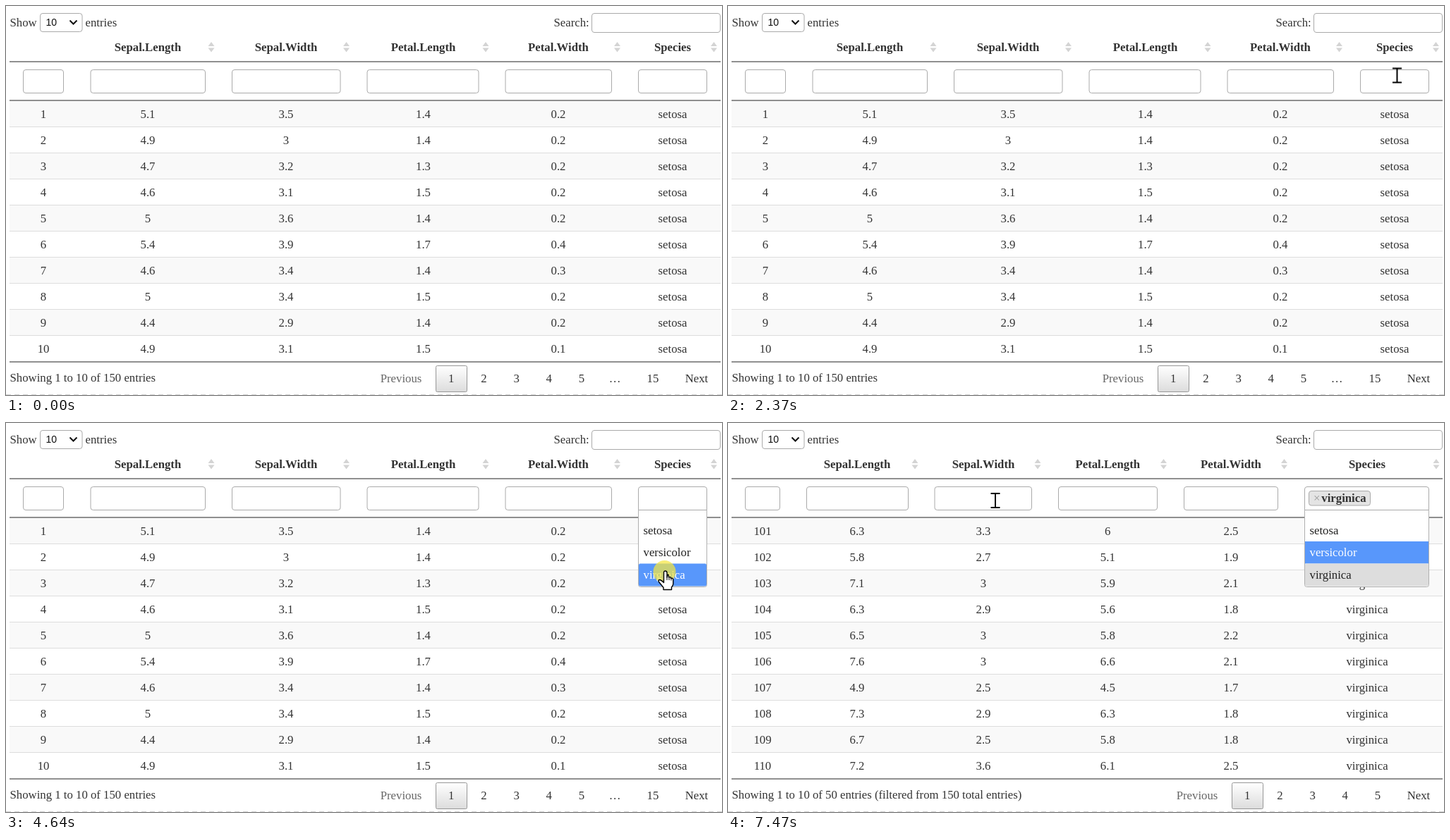
An HTML page that plays this animation: 1015x552 px, repeating every 8000 ms.

```html
<!DOCTYPE html>
<html lang="en">
<head>
<meta charset="utf-8">
<title>Iris table</title>
<style>
  html, body { margin: 0; width: 100%; height: 100%; overflow: hidden; background: #fff; }
  svg { display: block; width: 1015px; height: 552px; }
  text { font: 16.75px "Liberation Serif", "Times New Roman", serif; fill: #333; white-space: pre; }
  .bold { font-weight: bold; }
  .sans { font: 14px "Liberation Sans", Arial, sans-serif; fill: #111; }
</style>
</head>
<body>
<svg id="stage" viewBox="0 0 1015 552" xmlns="http://www.w3.org/2000/svg"></svg>
<script>
const LOOP = 8000;
const TOP = 134.5, ROW = 37;
const HEADS = ['', 'Sepal.Length', 'Sepal.Width', 'Petal.Length', 'Petal.Width', 'Species'];

const ALL = {
  centers: [53, 201, 397, 591.5, 783, 945],
  inputs: [[24.5, 81.5], [120, 282.5], [320.5, 474], [512, 670], [708, 858.5], [896.5, 993.5]],
  sorts: [291, 482.5, 680, 866.5, 1003.5],
  first: 1,
  species: 'setosa',
  rows: ['5.1 3.5 1.4 0.2', '4.9 3 1.4 0.2', '4.7 3.2 1.3 0.2', '4.6 3.1 1.5 0.2', '5 3.6 1.4 0.2',
    '5.4 3.9 1.7 0.4', '4.6 3.4 1.4 0.3', '5 3.4 1.5 0.2', '4.4 2.9 1.4 0.2', '4.9 3.1 1.5 0.1'],
  info: 'Showing 1 to 10 of 150 entries',
  page: 631.2,
  pages: ['1', '2', '3', '4', '5', '…', '15'],
};

const FILTERED = {
  centers: [49, 183, 362, 538.3, 713, 906],
  inputs: [[24.5, 73.5], [111.5, 255.5], [293, 430.5], [468.5, 608.5], [646.5, 779.5], [817.5, 993.5]],
  sorts: [265, 439, 617.5, 788.5, 1004],
  first: 101,
  species: 'virginica',
  rows: ['6.3 3.3 6 2.5', '5.8 2.7 5.1 1.9', '7.1 3 5.9 2.1', '6.3 2.9 5.6 1.8', '6.5 3 5.8 2.2',
    '7.6 3 6.6 2.1', '4.9 2.5 4.5 1.7', '7.3 2.9 6.3 1.8', '6.7 2.5 5.8 1.8', '7.2 3.6 6.1 2.5'],
  info: 'Showing 1 to 10 of 50 entries (filtered from 150 total entries)',
  page: 736.2,
  pages: ['1', '2', '3', '4', '5'],
};

// Pointer moves: start, end, number of steps, then [step, x, y] way points.
const MOVES = [
  [660, 1430, 12, [[0, 872, 548], [3, 890, 420], [6, 918, 235], [8, 936, 148], [9, 940, 129], [11, 957, 123]]],
  [1960, 2370, 6, [[0, 955, 118], [3, 950, 103], [5, 948.5, 98.5]]],
  [3760, 4380, 9, [[0, 948.5, 110], [2, 947, 138], [5, 940, 185], [8, 933, 211]]],
  [5760, 6460, 11, [[0, 925, 205], [2, 865, 178], [5, 705, 109], [7, 625, 73], [8, 592, 76], [10, 536.5, 95]]],
  [6920, 7270, 6, [[0, 515, 100], [3, 420, 108], [5, 380, 110]]],
  [7470, 7470, 1, [[0, 379, 110]]],
];

const text = (x, y, s, anchor = 'start', extra = '') =>
  `<text x="${x}" y="${y}" text-anchor="${anchor}" ${extra}>${s}</text>`;
const mid = (x, y, s, extra) => text(x, y, s, 'middle', extra);
const rect = (x1, y1, x2, y2, fill, extra = '') =>
  `<rect x="${x1}" y="${y1}" width="${x2 - x1}" height="${y2 - y1}" fill="${fill}" ${extra}/>`;
const box = (x1, y1, x2, y2, r = 3.5, fill = '#fff', stroke = '#aaa') =>
  rect(x1, y1, x2, y2, fill, `rx="${r}" stroke="${stroke}"`);
const path = (d, fill, extra = '') => `<path d="${d}" fill="${fill}" ${extra}/>`;
const rule = (y, color) => rect(5, y, 1013, y + 1, color);

function pointer(t) {
  const move = MOVES.filter(m => t >= m[0]).pop();
  if (!move) return null;
  const [start, end, count, pts] = move;
  const gap = (end - start) / (count - 1) || 1;
  const k = Math.min(count - 1, Math.floor((t - start) / gap + 0.01));
  const i = Math.max(1, pts.findIndex(p => p[0] >= k));
  const b = pts[i] || pts[0], a = pts[i - 1];
  const u = b === a ? 0 : (k - a[0]) / (b[0] - a[0]);
  return { x: a[1] + (b[1] - a[1]) * u, y: a[2] + (b[2] - a[2]) * u };
}

function pointerShape(p, view, open) {
  const over = ([a, b]) => p.x >= a && p.x <= b;
  const last = view.inputs[5];
  let art;
  if (p.y >= 90 && p.y <= 123.5 && view.inputs.some(over)) {
    art = path('M-6.5-11h13v2H1v18h5.5v2h-13v-2H-1V-9h-5.5z', '#000');
  } else if (p.y < 79 || (open && over(last) && p.y < 233)) {
    art = path('M-.5 1.5Q-.5-1 1.7-1T4 1.5V8Q6-.2 6.5 8Q9.5 6.500 9.500 9.500Q12.800 8 12.800 12V17' +
      'Q12.800 20 10.500 22V25.500H-1V22.500L-7.500 14.500Q-9 11.500-6 11.500Q-4 12-.5 15.500z',
      '#fff', 'stroke="#000" stroke-width="1.4" stroke-linejoin="round"') +
      path('M4 8v4M7 8.500v3.500M10 9.500v3', 'none', 'stroke="#000"');
  } else {
    art = path('M.5.5V20.500L5 16.300L8.200 23.500L11.200 22.200L8.100 15.200H14.800z', '#fff',
      'stroke="#222" stroke-width="1.1"');
  }
  return `<g transform="translate(${p.x} ${p.y})">${art}</g>`;
}

function topBar() {
  return text(5.5, 28.5, 'Show') + box(48.5, 10.5, 108, 36.5) +
    text(56.5, 28, '10', 'start', 'class="sans"') +
    path('M90.500 20.500l5 5l5-5', 'none', 'stroke="#111" stroke-width="2"') +
    text(112.5, 28.5, 'entries') + text(776.5, 28.5, 'Search:') + box(830.5, 10.5, 1012.5, 37.5);
}

function table(view, hover) {
  let s = '';
  view.rows.forEach((row, i) => {
    const y = TOP + ROW * i;
    const fill = i === hover ? '#f5f5f5' : i % 2 ? '#fff' : '#f9f9f9';
    s += rect(5, y, 1013, y + ROW, fill);
    if (i) s += rule(134 + ROW * i, '#ddd');
    [view.first + i, ...row.split(' '), view.species].forEach((cell, c) => {
      s += mid(view.centers[c], 158.6 + ROW * i, cell);
    });
  });
  s += rule(78.500, '#222') + rule(133.500, '#222') + rule(504.500, '#222');
  HEADS.forEach((h, c) => { s += mid(view.centers[c], 63.5, h, 'class="bold"'); });
  view.sorts.forEach(x => {
    s += path(`M${x - 4.5} 57h9l-4.500-6zM${x - 4.5} 59.500h9l-4.500 6z`, '#d4d4d4');
  });
  view.inputs.slice(0, 5).forEach(([a, b]) => { s += box(a, 90.5, b, 123.5); });
  return s;
}

function footer(view) {
  const x = view.page, y = 534;
  let s = text(5.5, 533, view.info) + mid(x - 71.2, y, 'Previous', 'style="fill:#666"') +
    box(x - 21.7, 510.5, x + 22.3, 547.5, 2, 'url(#btn)', '#979797');
  view.pages.forEach((p, i) => {
    const shift = p === '…' ? 1 : p === '15' ? 8.5 : 0;
    s += mid(x + 46.2 * i + shift, y, p);
  });
  return s + mid(979, y, 'Next') +
    path('M0 551.500H1015', 'none', 'stroke="#d2d2d2" stroke-dasharray="7 5"');
}

function dropdown(view, active, picked) {
  const [a, b] = view.inputs[5];
  const edges = [124, 136.5, 168, 199.5, 231.5];
  let s = path(`M${a} 123.500H${b}V229.500q0 3-3 3H${a + 3}q-3 0-3-3z`, '#fff', 'stroke="#b0b0b0"');
  ['', 'setosa', 'versicolor', 'virginica'].forEach((name, i) => {
    const on = i === active;
    const fill = on ? '#5897fb' : i === picked ? '#ddd' : '#fff';
    s += rect(a + 0.5, edges[i], b - 0.5, edges[i + 1], fill, i === 3 ? 'rx="2"' : '') +
      text(a + 7, 126.3 + 31.5 * i, name, 'start', `style="fill:${on ? '#fff' : '#222'}"`);
  });
  return s;
}

function speciesInput(view, open, stroke) {
  const [a, b] = view.inputs[5];
  const r = open ? 0 : 3.5;
  let s = path(`M${a} 94q0-3.500 3.500-3.500H${b - 3.5}q3.500 0 3.500 3.500V${123.5 - r}` +
    `q0 ${r} ${-r} ${r}H${a + r}q${-r} 0 ${-r} ${-r}z`, '#fff', `stroke="${stroke}"`);
  if (view === FILTERED) {
    s += box(823.5, 96.5, 910.5, 117, 3.5, '#e4e4e4', '#aaa') +
      text(830, 112, '×', 'start', 'style="fill:#999"') +
      text(841.3, 112, 'virginica', 'start', 'class="bold"');
  }
  return s;
}

function scene(t) {
  const view = t < 4900 ? ALL : FILTERED;
  const open = t >= 3230;
  const p = pointer(t);
  const onList = p && open && p.x >= view.inputs[5][0];
  const hover = p && !onList ? Math.floor((p.y + 7 - TOP) / ROW) : -1;

  let active = 0;
  if (view === FILTERED) active = p.y > 200 ? 3 : 2;
  else if (open) active = p.y < 137 ? 0 : p.y < 168 ? 1 : p.y < 199.5 ? 2 : 3;

  const focused = t >= 2700 && t < 4640;
  const stroke = !focused ? '#aaa' : t < 2770 ? '#666' : '#111';
  const list = open ? `<g opacity="${t < 3300 ? 0.5 : 1}">` +
    dropdown(view, active, view === FILTERED ? 3 : -1) + '</g>' : '';

  const spot = t >= 2700 && t < 2970 ? [946, 97] : t >= 4640 && t < 4900 ? [933.5, 211] : null;
  const click = spot ? `<circle cx="${spot[0]}" cy="${spot[1]}" r="16" fill="#f5e642" opacity=".72"/>` : '';

  return '<defs><linearGradient id="btn" x2="0" y2="1"><stop stop-color="#fff"/>' +
    '<stop offset="1" stop-color="#dcdcdc"/></linearGradient></defs>' +
    topBar() + table(view, hover) + footer(view) + list +
    speciesInput(view, open, stroke) + click + (p ? pointerShape(p, view, open) : '');
}

const stage = document.getElementById('stage');
const begin = performance.now();
let shown = '';

function tick() {
  const markup = scene((performance.now() - begin) % LOOP);
  if (markup !== shown) stage.innerHTML = shown = markup;
  requestAnimationFrame(tick);
}
tick();
</script>
</body>
</html>
```
